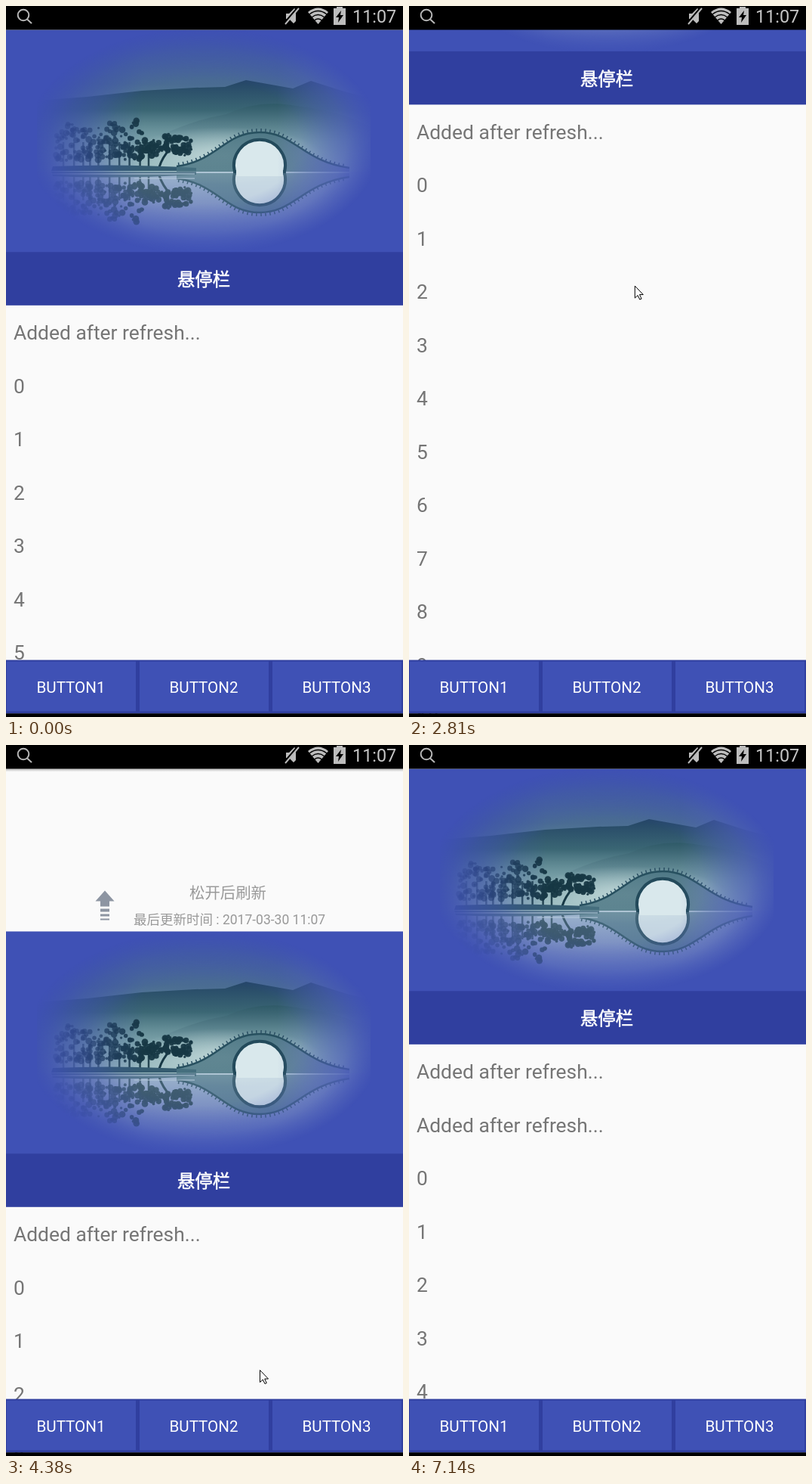
These frames come from a looping animation (526x940 px, 7750 ms). An HTML page:

```html
<!DOCTYPE html>
<html lang="zh-CN">
<head>
<meta charset="utf-8">
<title>Pull to refresh</title>
<style>
html, body { margin: 0; width: 100%; height: 100%; overflow: hidden; background: #fafafa; }
svg { display: block; width: 526px; height: 940px; }
text { font-family: Roboto, "Noto Sans CJK SC", "Noto Sans CJK JP", sans-serif; }
#list text { font-size: 26.4px; fill: #757575; }
#head text { fill: #999; }
.btn { font-size: 20.6px; fill: #fff; text-anchor: middle; }
.title { font-size: 23.4px; fill: #fff; stroke: #fff; stroke-width: .6px; text-anchor: middle; }
</style>
</head>
<body>
<svg viewBox="0 0 526 940">
  <defs>
    <radialGradient id="fade">
      <stop offset=".55" stop-color="#fff"/>
      <stop offset=".8" stop-color="#fff" stop-opacity=".62"/>
      <stop offset="1" stop-color="#fff" stop-opacity="0"/>
    </radialGradient>
    <mask id="oval" maskUnits="userSpaceOnUse" x="41" y="32" width="442" height="294">
      <ellipse cx="262" cy="179" rx="236" ry="150" fill="url(#fade)"/>
    </mask>
    <linearGradient id="sky" x2="0" y2="1">
      <stop offset="0" stop-color="#3f56a6"/>
      <stop offset=".38" stop-color="#4a6c92"/>
      <stop offset=".65" stop-color="#66909a"/>
      <stop offset="1" stop-color="#a0c0c4"/>
    </linearGradient>
    <linearGradient id="water" x2="0" y2="1">
      <stop offset="0" stop-color="#9db5cc"/>
      <stop offset=".45" stop-color="#7a8ec2"/>
      <stop offset="1" stop-color="#4a5dbb"/>
    </linearGradient>
    <linearGradient id="far" x2="0" y2="1">
      <stop offset="0" stop-color="#244566"/>
      <stop offset=".5" stop-color="#376370" stop-opacity=".9"/>
      <stop offset="1" stop-color="#6d959c" stop-opacity="0"/>
    </linearGradient>
    <linearGradient id="near" x2="0" y2="1">
      <stop offset="0" stop-color="#2f5a68"/>
      <stop offset="1" stop-color="#7ea2ac" stop-opacity="0"/>
    </linearGradient>
    <linearGradient id="stone">
      <stop offset="0" stop-color="#4a7482"/>
      <stop offset=".55" stop-color="#46707f"/>
      <stop offset="1" stop-color="#6479b0"/>
    </linearGradient>
    <radialGradient id="glow">
      <stop offset="0" stop-color="#d3e6e4" stop-opacity=".75"/>
      <stop offset="1" stop-color="#d3e6e4" stop-opacity="0"/>
    </radialGradient>
    <linearGradient id="tint">
      <stop offset="0" stop-color="#3a50a4" stop-opacity=".85"/>
      <stop offset=".32" stop-color="#3a50a4" stop-opacity="0"/>
      <stop offset=".72" stop-color="#6274bd" stop-opacity="0"/>
      <stop offset="1" stop-color="#5567ba" stop-opacity=".8"/>
    </linearGradient>
    <linearGradient id="shade" x2="0" y2="1">
      <stop offset="0" stop-color="#bbb"/>
      <stop offset="1" stop-color="#fafafa"/>
    </linearGradient>
    <g id="trees">
      <g id="leaves" fill="#173845"></g>
      <g id="trunks" stroke="#173845" stroke-width="2.500"></g>
      <path d="M203 213Q207 200 218 188" fill="none" stroke="#173845" stroke-width="3"/>
      <path d="M62 212Q150 208 252 214V218H60Z" fill="#355c70"/>
    </g>
    <g id="bridge">
      <path d="M226 212C280 205 290 167 336 167S392 205 455 214V219H226Z" fill="url(#stone)" opacity=".8"/>
      <path d="M226 212C280 205 290 167 336 167S392 205 455 214" fill="none" stroke="#27505f" stroke-width="2.500"/>
      <path d="M228 209C280 202 290 164 336 164S392 202 450 211" fill="none" stroke="#2b5064" stroke-width="4" stroke-dasharray="1.5 4.5"/>
      <path d="M303 219A34 34 0 1 1 369 219Z" fill="#d9e8ec" stroke="#234a5b" stroke-width="4"/>
    </g>
  </defs>

  <rect width="526" height="940" fill="#fafafa"/>
  <g id="list"></g>

  <g id="photo">
    <rect y="31.500" width="526" height="295" fill="#3f51b5"/>
    <g mask="url(#oval)">
      <rect x="41" y="32" width="442" height="188" fill="url(#sky)"/>
      <rect x="41" y="219" width="442" height="108" fill="url(#water)"/>
      <path d="M41 125L108 120L180 112L250 108L290 107L318 98L346 103L380 109L404 99L448 113L483 122V178H41Z" fill="url(#far)"/>
      <path d="M205 171Q250 150 292 143Q337 122 390 133Q445 139 483 160V195H205Z" fill="url(#near)"/>
      <ellipse cx="290" cy="198" rx="130" ry="38" fill="url(#glow)"/>
      <use href="#trees" transform="matrix(1 0 0 -1 0 437)" opacity=".65"/>
      <use href="#bridge" transform="matrix(1 0 0 -1 0 440)" opacity=".75"/>
      <use href="#trees"/>
      <use href="#bridge"/>
      <path d="M60 222H250M170 228H250" stroke="#b5c9db" stroke-width="1.500" opacity=".7"/>
      <rect x="305" y="215" width="62" height="10" fill="#d9e8ec"/>
      <rect x="41" y="32" width="442" height="294" fill="url(#tint)"/>
    </g>
  </g>

  <g id="bar">
    <rect y="325.300" width="526" height="70.500" fill="#303f9f"/>
    <text class="title" x="262" y="370">悬停栏</text>
  </g>

  <rect id="edge" y="31.500" width="526" height="4" fill="url(#shade)"/>
  <g id="head">
    <text id="tip" x="294" y="60" font-size="20.4" text-anchor="middle"></text>
    <text x="169" y="94" font-size="17.5">最后更新时间 : 2017-03-30 11:07</text>
    <path id="arrow" d="M131 50L143.500 64H137V71H125V64H118.500ZM125 74H137V78H125ZM125 81H137V84H125ZM125 87H137V89H125Z" fill="#8d95a2"/>
    <g id="spin" fill="none" stroke="#8d95a2" stroke-width="5"></g>
  </g>

  <rect width="526" height="31.500"/>
  <g fill="#bdbdbd">
    <path d="M371 10H375L382 3L384 5V20L381 23L375 17H371Z"/>
    <path d="M400 8Q413.500 -3 427 8L413.500 24Z"/>
    <path d="M438 3V1H446V3H450V25H434V3Z"/>
  </g>
  <path d="M386 3L368 24" stroke="#000" stroke-width="3"/>
  <g fill="none" stroke="#b8b8b8" stroke-width="2">
    <circle cx="23" cy="12" r="7.300"/>
    <path d="M28 17.500L34 23"/>
    <path d="M388 3L370 24"/>
  </g>
  <path d="M402 11Q413.500 2 425 11M405 15Q413.500 8 422 15M408.500 19Q413.500 15 418.500 19" fill="none" stroke="#000" stroke-width="1.300"/>
  <path d="M444 6L437 15H441L440 22L447 12H443Z"/>
  <text x="459" y="22.300" font-size="23.4" fill="#c6c6c6">11:07</text>

  <rect y="864.600" width="526" height="71" fill="#303f9f"/>
  <rect y="935.300" width="526" height="4.700"/>
  <g id="buttons"></g>
  <path id="cursor" d="M.5 .5V16.500L4.300 13L7 18.500L9.300 17.500L6.700 12H11.500Z" fill="#fff" stroke="#000"/>
</svg>

<script>
const LOOP = 7750, ROW = 70.5, HEAD = 72.5, PULL = 215, TRAVEL = 420, PIN = -293.8;
const ARMED = 3885, RELEASED = 4700, DONE = 6500;
const $ = id => document.getElementById(id);

function add(parent, tag, attrs, text = '') {
  const el = document.createElementNS('http://www.w3.org/2000/svg', tag);
  for (const k in attrs) el.setAttribute(k, attrs[k]);
  el.textContent = text;
  return $(parent).appendChild(el);
}

const shift = (id, x, y) => $(id).setAttribute('transform', `translate(${x} ${y})`);
const show = (id, on) => $(id).style.display = on ? '' : 'none';

// Progress through a time span, 0 to 1
const span = (t, from, to) => Math.min(1, Math.max(0, (t - from) / (to - from)));
const easeOut = p => 1 - (1 - p) ** 2;

// Swipes start slowly; the powers are shared by the list and the pointer
const UP = 3, DOWN = 1.227;

function scrollAt(t) {
  return TRAVEL * (span(t, 2470, 3240) ** DOWN - span(t, 870, 2350) ** UP)
    + PULL * span(t, 3630, 4380)
    - (PULL - HEAD) * easeOut(span(t, RELEASED, 5000))
    - HEAD * easeOut(span(t, 6520, 6840));
}

// Pointer strokes: from, to, dx, dy, power
const strokes = [
  [320, 680, -231, 80, 1],
  [870, 1560, -10, 0, 1],
  [870, 2350, 0, -286, UP],
  [2350, 2470, 9, -28, 1],
  [2470, 3240, 13, 352, DOWN],
  [3260, 3490, 5, -367, 1],
  [3630, 4380, 24, 601, 1],
  [5000, 5190, 16, -84, 1],
  [5190, 5960, 38, -22, 1],
  [6700, 7140, 50, 222, 1]
];

function pointerAt(t) {
  let x = 526, y = 474;
  for (const [from, to, dx, dy, power] of strokes) {
    const p = span(t, from, to) ** power;
    x += dx * p;
    y += dy * p;
  }
  return [x, y];
}

const rows = Array.from({ length: 15 }, (_, i) =>
  add('list', 'text', { x: 10, y: 441.3 + i * ROW }));

for (let i = 0; i < 3; i++) {
  const x = 1 + i * 176;
  add('buttons', 'rect', { x, y: 866.6, width: 171, height: 65.8, fill: '#3f51b5' });
  add('buttons', 'text', { x: x + 85, y: 908, class: 'btn' }, 'BUTTON' + (i + 1));
}

// A tall grove on the left, one peak at x = 171, a low spreading tree on the right
let seed = 7;
const rnd = () => (seed = seed * 16807 % 2147483647) / 2147483647;
function canopy(x) {
  const peak = 138 + 3.2 * Math.abs(x - 171);
  const low = 169 + .25 * Math.abs(x - 215);
  return x < 182 ? [Math.min(peak, 152 + 12 * Math.sin(x / 9) ** 2), 204] : [low, low + 24];
}
for (let i = 0; i < 280; i++) {
  const x = 66 + 180 * rnd(), [top, bottom] = canopy(x);
  add('leaves', 'circle', {
    cx: x, cy: top + (bottom - top) * rnd(), r: 1.5 + 3 * rnd(), opacity: .5 + .45 * span(x, 66, 170)
  });
}
for (let x = 76; x < 190; x += 9 + 6 * rnd()) {
  add('trunks', 'path', { d: `M${x} 180V213`, opacity: .4 + .5 * span(x, 66, 170) });
}

// Ring of arcs that grow darker towards the leading end
const SEGS = 48, STEP = 2 * Math.PI / SEGS;
const rim = a => `${131 + 21 * Math.sin(a)} ${68 - 21 * Math.cos(a)}`;
for (let i = 0; i < SEGS; i++) {
  const a = 2.45 + i * STEP;
  add('spin', 'path', {
    d: `M${rim(a)}A21 21 0 0 1 ${rim(a + STEP)}`,
    'stroke-opacity': .05 + .95 * i / SEGS
  });
}

function draw(t) {
  const off = scrollAt(t), loading = t >= RELEASED, extra = t >= DONE ? 2 : 1;

  shift('list', 0, off);
  shift('photo', 0, off);
  shift('bar', 0, Math.max(off, PIN));
  rows.forEach((row, i) => row.textContent = i < extra ? 'Added after refresh...' : i - extra);

  shift('head', 0, off - HEAD);
  show('head', off > .01);
  show('edge', off > 4);
  $('tip').textContent = loading ? '正在加载中' : t < ARMED ? '下拉刷新' : '松开后刷新';
  show('arrow', !loading);
  show('spin', loading);
  $('arrow').setAttribute('transform', `rotate(${180 * (1 - span(t, ARMED, ARMED + 150))} 131 69)`);
  $('spin').setAttribute('transform', `rotate(${(t - 6060) * .36} 131 68)`);

  show('cursor', t >= 320 && t < 7140);
  shift('cursor', ...pointerAt(t));
}

const start = performance.now();
function tick() {
  draw((performance.now() - start) % LOOP);
  requestAnimationFrame(tick);
}
tick();
</script>
</body>
</html>
```
